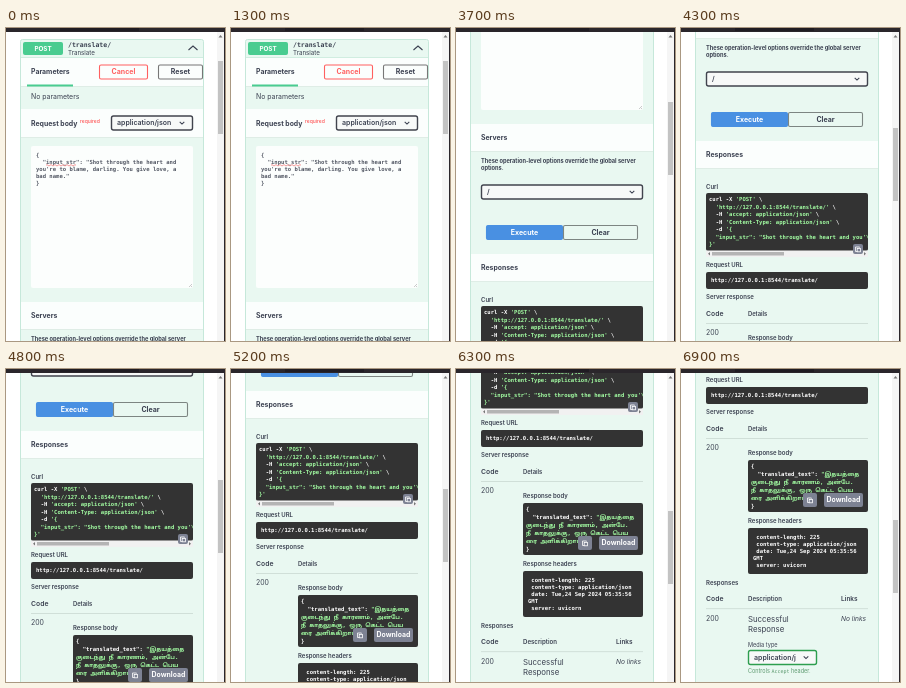
An HTML page that plays this animation: 219 by 313 pixels, repeating every 7000 ms.

```html
<!DOCTYPE html>
<html lang="en">
<head>
<meta charset="utf-8">
<title>API console</title>
<style>
  html, body { margin: 0; width: 100%; height: 100%; overflow: hidden; background: #fff; }
  svg { display: block; width: 219px; height: 313px; }
  text { white-space: pre; font-family: Inter, "Liberation Sans", Arial, sans-serif; }
  .mono { font-family: "DejaVu Sans Mono", "Noto Sans Tamil", "Noto Sans", monospace; font-weight: 700; }
</style>
</head>
<body>
<svg viewBox="0 0 219 313">
  <defs>
    <clipPath id="curlClip"><rect x="25" y="456" width="162" height="58"/></clipPath>
    <clipPath id="bodyClip"><rect x="67" y="608" width="120" height="52"/></clipPath>
  </defs>
  <g id="page">
    <rect x="14.5" y="11.5" width="183" height="900" rx="2" fill="#e9f8f1" stroke="#c6e8da"/>
    <g id="request"></g>
    <g id="responses"></g>
  </g>
  <rect x="211" width="7" height="313" fill="#f5f5f5"/>
  <path d="M212.5 9.5l2-2.5 2 2.5z" fill="#777"/>
  <rect id="thumb" x="212" y="33" width="5" height="73" fill="#c3c3c3"/>
  <path d="M0 0H219V313H218V4H0z" fill="#2a262b"/>
  <rect x="54" width="79" height="3" fill="#1f1c22"/>
</svg>
<script>
const INK = '#3b4151', GREEN = '#49cc90', STRING = '#a2fca2', DARK = '#333';
const MONO_SIZE = 5.55;
const byId = id => document.getElementById(id);

const rect = (x, y, w, h, fill, extra = '') =>
  `<rect x="${x}" y="${y}" width="${w}" height="${h}" fill="${fill}" ${extra}/>`;

// y is the vertical middle of the line
const text = (x, y, s, size = 7, weight = 600, fill = INK, extra = '') =>
  `<text x="${x}" y="${y + size * 0.35}" font-size="${size}" font-weight="${weight}" fill="${fill}" ${extra}>${s}</text>`;

const code = (x, y, s, fill = '#fff', strings) => {
  const marked = strings ? s.replace(strings, m => `<tspan fill="${STRING}">${m}</tspan>`) : s;
  return text(x, y, marked, MONO_SIZE, 700, fill, 'class="mono"');
};

const codeLines = (x, y, pitch, lines, fill, strings) =>
  lines.map((s, i) => code(x, y + i * pitch, s, fill, strings)).join('');

const strip = (y, h) => rect(15, y, 182, h, '#fbfefd') +
  rect(15, y + h, 182, 0.7, '#dce9e3');
const label = (x, y, s) => text(x, y, s, 6);
const darkBox = (x, y, h) => rect(x, y, 187 - x, h, DARK, 'rx="2"');
const rule = y => rect(25, y, 162, 0.6, '#c0cfc8');

const chevron = (x, y, rx, ry) =>
  `<path d="M${x - rx} ${y - ry}l${rx} ${ry * 2} ${rx} ${-ry * 2}" fill="none" stroke="${INK}" stroke-width="1.1"/>`;

const button = (x, y, w, s, color, fill = 'none', ink = color) =>
  rect(x + 0.5, y + 0.5, w - 1, 14, fill, `rx="1.5" stroke="${color}" stroke-width="1.1"`) +
  text(x + w / 2, y + 7.3, s, 7, 700, ink, 'text-anchor="middle"');

const select = (x, y, w, s, color = '#41444e') =>
  rect(x + 0.5, y + 0.5, w - 1, 14, '#f7f9f8', `rx="2" stroke="${color}" stroke-width="1.4"`) +
  text(x + 6, y + 7.5, s, 7) + chevron(x + w - 11, y + 7.5, 2.3, 1.1);

const copyIcon = (x, y, size) =>
  rect(x, y, size, size, '#7d8293', 'rx="2"') +
  `<g transform="translate(${x + size / 2 - 3} ${y + size / 2 - 3})" fill="none" stroke="#fff" stroke-width=".8">
    <path d="M4.5 1.5V1H.5V5.5H2"/><rect x="2.2" y="2.5" width="3.3" height="3.3"/></g>`;

byId('request').innerHTML = [
  rect(17, 14, 40, 13, GREEN, 'rx="2"'),
  text(37, 20.5, 'POST', 6.3, 700, '#fff', 'text-anchor="middle"'),
  text(62, 17, '/translate/', 6.5, 700, INK, 'class="mono"'),
  text(62, 24.5, 'Translate', 6.2, 400),
  chevron(187, 20, 4.5, -2),
  rect(15, 29, 182, 0.7, '#c6e8da'),

  strip(30, 28),
  text(25, 44, 'Parameters', 6.9, 700),
  rect(21, 56.5, 46, 2, GREEN),
  button(93, 36.5, 49, 'Cancel', '#ff6060'),
  button(152, 36.5, 45, 'Reset', '#777', 'none', INK),
  text(25, 68.5, 'No parameters', 6.9, 400),

  strip(81, 28),
  text(25, 95.5, 'Request body', 6.9, 700),
  text(74, 93, 'required', 5, 400, '#f33'),
  select(105, 87.5, 82, 'application/json'),

  rect(25, 118, 162, 142, '#fcfefd', 'rx="2"'),
  codeLines(30, 127, 7, [
    '{',
    '  "input_str": "Shot through the heart and',
    "you're to blame, darling. You give love, a",
    'bad name."',
    '}'
  ], '#555a66'),
  '<path d="M40 137.3q1-1.4 2 0t2 0 2 0 2 0 2 0 2 0 2 0 2 0 2 0 2 0 2 0 2 0 2 0 2 0 2 0" fill="none" stroke="#e55" stroke-width=".6"/>',
  '<path d="M183 259l3-3M185 259l1-1" stroke="#999" stroke-width=".5"/>',

  strip(274, 27),
  text(25, 287.5, 'Servers', 6.9, 700),
  text(25, 310.7, 'These operation-level options override the global server', 5.65, 700),
  text(25, 317.8, 'options.', 5.65, 700),
  select(25, 334.5, 162, '/'),
  button(30, 375, 77, 'Execute', '#4990e2', '#4990e2', '#fff'),
  button(107, 375, 75, 'Clear', '#7d8582', 'none', INK)
].join('');

byId('responses').innerHTML = [
  strip(404, 27),
  text(25, 418, 'Responses', 6.9, 700),

  label(25, 449.5, 'Curl'),
  darkBox(25, 456, 58),
  '<g clip-path="url(#curlClip)">',
  codeLines(28, 462.5, 7.5, [
    "curl -X 'POST' \\",
    "  'http://127.0.0.1:8544/translate/' \\",
    "  -H 'accept: application/json' \\",
    "  -H 'Content-Type: application/json' \\",
    "  -d '{",
    "  \"input_str\": \"Shot through the heart and you'\\''re to blame",
    "}'"
  ], '#fff', /'.*?'(?= \\)|['"{}].*/),
  '</g>',
  rect(25, 513.5, 162, 6.5, '#f1f1f1'),
  rect(31, 515, 72, 3.5, '#b4b4b4'),
  '<path d="M29 515v3.5l-2-1.7zM183 515v3.5l2-1.7z" fill="#777"/>',
  copyIcon(172, 507, 10),

  label(25, 528, 'Request URL'),
  darkBox(25, 535, 17),
  code(30, 543.5, 'http://127.0.0.1:8544/translate/'),

  label(25, 560, 'Server response'),
  text(25, 577, 'Code', 6.8),
  text(67, 577, 'Details', 5.8),
  rule(586),
  text(25, 596, '200', 6.9, 400),

  label(67, 601, 'Response body'),
  darkBox(67, 608, 52),
  '<g clip-path="url(#bodyClip)">',
  code(70, 614.5, '{'),
  code(70, 622.5, '  "translated_text": "இதயத்தை', '#fff', /"இ.*/),
  codeLines(70, 630.5, 8, [
    'குடைந்து நீ காரணம், அன்பே.',
    'நீ காதலுக்கு, ஒரு கெட்ட பெய',
    'ரை அளிக்கிறாய்."'
  ], STRING),
  code(70, 654.5, '}'),
  '</g>',
  copyIcon(122, 641, 14),
  rect(143, 641, 39, 14, '#7d8293', 'rx="2"'),
  text(162.5, 648, 'Download', 6.9, 700, '#fff', 'text-anchor="middle"'),

  label(67, 669, 'Response headers'),
  darkBox(67, 676, 46),
  codeLines(72, 685, 7, [
    ' content-length: 225 ',
    ' content-type: application/json ',
    ' date: Tue,24 Sep 2024 05:35:56',
    'GMT ',
    ' server: uvicorn '
  ]),

  text(25, 731, 'Responses', 6.1),
  text(25, 747, 'Code', 6.8),
  text(67, 747, 'Description', 6.1),
  text(160, 747, 'Links', 6.5),
  rule(756.5),
  text(25, 767, '200', 6.9, 400),
  text(67, 767.5, 'Successful', 7.8, 400),
  text(67, 777.5, 'Response', 7.8, 400),
  text(160, 767, 'No links', 6.6, 400, INK, 'font-style="italic"'),
  text(67, 793, 'Media type', 5.6, 400),
  select(67, 798, 69, 'application/j', '#2e9e4f'),
  text(67, 819, 'Controls <tspan class="mono" style="font-weight:400" font-size="5">Accept</tspan> header.', 5.5, 400, '#5d9a70')
].join('');

// [time in ms, scroll offset]
const SCROLL = [[0, 0], [1900, 0], [2700, 148], [3000, 159], [3600, 159], [4300, 291],
  [5200, 382], [6300, 474], [6600, 474], [6900, 517], [7000, 517]];
const LOOP = 7000, STEP = 100, LOADING_GAP = 47;

function scrollAt(t) {
  const i = SCROLL.findIndex(([time]) => time > t);
  const [t0, y0] = SCROLL[i - 1], [t1, y1] = SCROLL[i];
  return Math.round(y0 + (y1 - y0) * (t - t0) / (t1 - t0));
}

function draw(now) {
  const t = Math.floor(now % LOOP / STEP) * STEP;
  const scroll = scrollAt(t);
  const gap = t >= 3200 && t < 3500 ? LOADING_GAP : 0;
  byId('page').setAttribute('transform', `translate(0 ${-scroll})`);
  byId('responses').setAttribute('transform', `translate(0 ${gap})`);
  byId('thumb').setAttribute('y', Math.round(33 + scroll * 0.229));
}

const start = performance.now();
function tick() {
  draw(performance.now() - start);
  requestAnimationFrame(tick);
}
tick();
</script>
</body>
</html>
```
